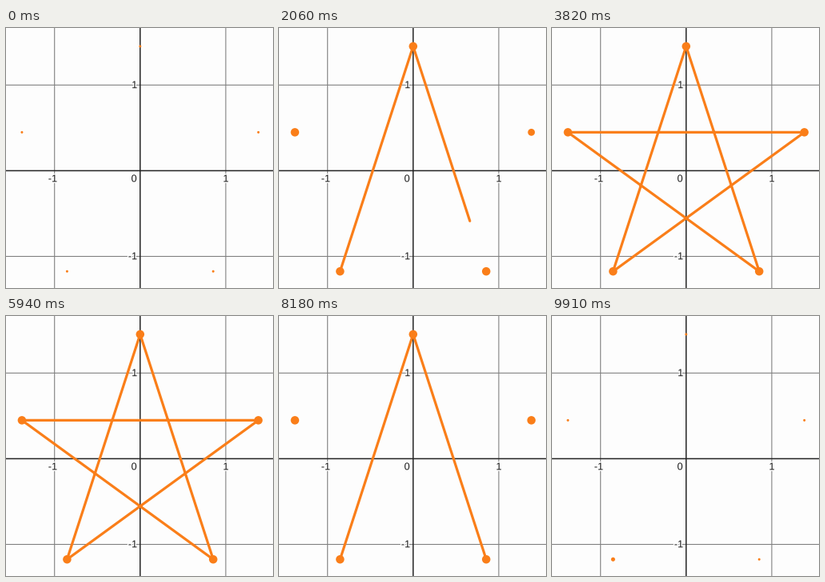
These frames come from a looping animation (334 by 325 pixels, 9940 ms). A matplotlib script:

```python
import numpy as np
import matplotlib.pyplot as plt
from matplotlib.animation import FuncAnimation
from matplotlib.patches import Circle
from matplotlib.patheffects import withStroke

W, H, DPI = 334, 325, 100
LOOP, STEP = 9940, 20
PX = 72 / DPI                      # points per pixel
CX, CY, UNIT = 167.8, 178.4, 107.1
RADIUS = 155.5
ORANGE, PAPER = "#fa7e19", "#fdfdfd"
R_MIN, R_MAX = 1.5, 5.25

# Star corners in drawing order, starting at the bottom left.
angles = np.radians(234 + 216 * np.arange(6))
star = np.column_stack([CX + RADIUS * np.cos(angles),
                        CY - RADIUS * np.sin(angles)])

# Slider: 0-5 grows the dots one by one, 3-8 draws the edges.
KEY_TIMES = [30, 1420, 3469, 6864, 8180, 9910, 9940]
KEY_VALUES = [0, 3.312, 8, 8, 5, 0.25, 0.17]

fig = plt.figure(figsize=(W / DPI, H / DPI), dpi=DPI, facecolor=PAPER)
ax = fig.add_axes([0, 0, 1, 1])
ax.set_xlim(0, W)
ax.set_ylim(H, 0)
ax.axis("off")


def rule(offset, color, width, zorder):
    style = dict(color=color, lw=width * PX, zorder=zorder, snap=False)
    ax.axvline(CX + offset, **style)
    ax.axhline(CY + offset, **style)


rule(-UNIT, "#808080", 1.1, 1)
rule(UNIT, "#808080", 1.1, 1)
rule(0, "#222222", 1.5, 3)


def label(x, y, text, ha):
    ax.text(x, y, text, ha=ha, va="center_baseline", family="Liberation Sans",
            size=12.8 * PX, color="#1a1a1a", zorder=2,
            path_effects=[withStroke(linewidth=3 * PX, foreground=PAPER)])


label(58.5, 187.8, "-1", "center")
label(275, 187.8, "1", "center")
label(163.7, 187.8, "0", "right")
label(164.3, 70.7, "1", "right")
label(164.3, 284.8, "-1", "right")

edge, = ax.plot([], [], color=ORANGE, lw=3.2 * PX, zorder=4, snap=False,
                solid_capstyle="round", solid_joinstyle="round")
dots = [ax.add_patch(Circle(p, R_MIN, fc=ORANGE, lw=0, zorder=5, snap=False))
        for p in star[:5]]


def update(i):
    a = np.interp(i * STEP, KEY_TIMES, KEY_VALUES)
    for k, dot in enumerate(dots):
        dot.set_radius(R_MIN + (R_MAX - R_MIN) * np.clip(a - k, 0, 1))

    drawn = a - 3
    if drawn <= 0:
        edge.set_data([], [])
    else:
        n = min(int(drawn), 4)
        tip = star[n] + (drawn - n) * (star[n + 1] - star[n])
        edge.set_data(*np.vstack([star[:n + 1], tip]).T)
    return [edge, *dots]


anim = FuncAnimation(fig, update, frames=LOOP // STEP, interval=STEP,
                     repeat=True, repeat_delay=0)
plt.show()
```
